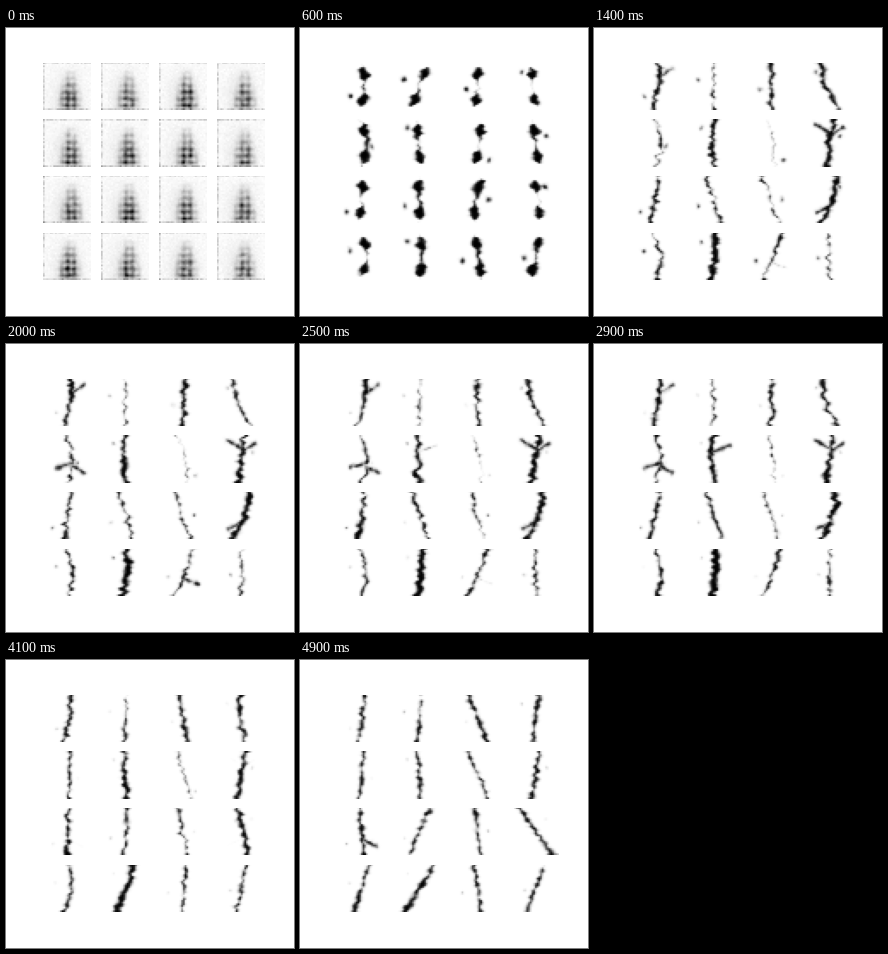
A matplotlib script for the animation above (5.1 s loop, 288 by 288 pixels).

```python
import numpy as np
import matplotlib.pyplot as plt
from matplotlib.animation import FuncAnimation

SIZE, TICKS, LAST = 28, 51, 49
BLOBS, STROKES, SETTLE, SETTLED = 6, 13, 36, 46  # ticks where the look changes
Y, X = np.mgrid[0:SIZE, 0:SIZE] + 0.5

# One value per cell: half the sideways travel from top to bottom in each phase,
# the bulge of the middle, and the half width of the stroke.
BLOB_LEAN = [0, 5, 1, -2, 0, -1, 2, -2, 1, 0, 2, -2, 0, 0, -2, 2]
LEAN = [2, 0, 0, -5, 0, 0, -2, 2, 2, -4, -4, 4, -1, 1, 5, 0]
FINAL_LEAN = [2, 1, -5, 2, 1, -1, -6, 2, -1, 6, -2, -9, 4, 8, -2, 5]
BEND = [2, 0, 0, -2, 3, -1, 1, 0, 0, 0, -1, 2, 3, 1, 1, 0]
WEIGHT = [1, 0, 1, .8, .4, 1.2, -.5, 1.5, .8, .5, .2, 1.5, .6, 1.9, .6, .3]

# Side branches: cell, tip, first and last tick.
ARMS = [(0, (24, 4), 10, 36), (4, (24, 22), 17, 30), (4, (8, 19), 17, 30),
        (5, (24, 6), 25, 36), (7, (6, 3), 11, 37), (7, (22, 5), 11, 37),
        (11, (7, 22), 11, 37), (14, (23, 21), 14, 22), (8, (23, 23), 42, 60)]


def ramp(t, start, end):
    k = np.clip((t - start) / (end - start), 0, 1)
    return k * k * (3 - 2 * k)


def mix(a, b, k):
    return a + (b - a) * k


def blur(a):
    """Three-tap smoothing along every axis."""
    for axis in range(a.ndim):
        pad = [(1, 1) if i == axis else (0, 0) for i in range(a.ndim)]
        p = np.moveaxis(np.pad(a, pad, mode="edge"), axis, 0)
        a = np.moveaxis((p[:-2] + 2 * p[1:-1] + p[2:]) / 4, 0, axis)
    return a


def segment(a, b):
    """Distance of every pixel from the line between two points."""
    (ax, ay), (bx, by) = a, b
    dx, dy = bx - ax, by - ay
    u = np.clip(((X - ax) * dx + (Y - ay) * dy) / (dx * dx + dy * dy), 0, 1)
    return np.hypot(X - ax - u * dx, Y - ay - u * dy)


def glyph(t, cell):
    """Ink of a handwritten one: blobs first, then a rough stroke, then a clean one."""
    traits = np.random.default_rng(cell)
    noise = np.random.default_rng(1000 * t + cell)
    stroke = ramp(t, BLOBS, STROKES)
    final = ramp(t, SETTLE, SETTLED)

    lean = mix(mix(BLOB_LEAN[cell], LEAN[cell], stroke), FINAL_LEAN[cell], final)
    bend = BEND[cell] * (1 - .9 * final)

    def spine(y):
        return 14.3 + lean * (14 - y) / 13 + bend * np.cos(np.pi * (y - 14) / 26)

    y = Y[:, :1]
    waist = traits.uniform(-1.5, .6)
    blobs = waist + (2.9 - waist) * (np.exp(-((y - 7) / 3.6) ** 2)
                                     + np.exp(-((y - 22) / 3.6) ** 2))
    blobs -= 2.5 * np.exp(-((y - 14.5) / 12) ** 2 * -1 - 1.6) * (abs(y - 14.5) > 11)
    taper = traits.uniform(-.35, .35) * (y - 14) / 13
    line = mix(WEIGHT[cell], .55 + .3 * WEIGHT[cell], final) + taper
    lumps = blur(noise.normal(0, 1, SIZE))[:, None] + .4 * np.cos(np.pi * y / 2)
    width = mix(blobs, line - .1, stroke) + mix(.35, .45, stroke) * lumps

    sway = blur(noise.normal(0, 1, SIZE))[:, None] * mix(.8, 1 - .35 * final, stroke)
    upright = 1 / np.hypot(1, lean / 13)
    field = abs(X - spine(Y) - sway) * upright - width

    for owner, tip, start, end in ARMS:
        shown = ramp(t, start - 3, start + 3) * (1 - ramp(t, end, end + 5))
        if owner == cell and shown > 0:
            root_y = (tip[1] + 14) / 2
            arm = segment((spine(root_y), root_y), tip) - mix(-2, .6, shown)
            field = np.minimum(field, arm)

    side = traits.choice([-1, 1])
    speck_x, speck_y = 14 + side * traits.uniform(6, 9), traits.uniform(4, 24)
    speck = np.hypot(X - speck_x, Y - speck_y) - mix(.9, -.6, ramp(t, BLOBS, 30))
    field = np.minimum(field, speck)

    field = field + .75 * blur(noise.normal(0, 1, X.shape))
    return 1 / (1 + np.exp(np.clip(field / .42, -30, 30)))


def untrained(cell):
    """The blurred, checkered column that every cell starts from."""
    rng = np.random.default_rng(100 + cell)
    centre, gain = 16 + rng.normal(0, .3), .72 + rng.normal(0, .05)
    spread = 3.2 + 2.2 * np.clip((Y - 7) / 16, 0, 1)
    column = np.exp(-abs((X - centre) / spread) ** 3)
    rise = np.clip((Y - 4) / 16, 0, 1) * np.where(Y > 26, .6, 1)
    checks = .6 + .2 * np.cos(np.pi * (X - 14.5) / 2) + .22 * np.cos(np.pi * (Y - 21.5) / 2)
    patches = 1 + .5 * blur(rng.normal(0, 1, X.shape))
    ink = gain * column * rise * checks * patches
    ink += .09 * np.exp(-((X - 14) / 8) ** 2) * np.clip(Y / 18, 0, 1) + .02
    for edge in (ink[:, 0], ink[0], ink[-1]):
        edge += rng.uniform(0, .22, SIZE)
    return ink + rng.normal(0, .012, X.shape)


START = [untrained(cell) for cell in range(16)]


def sample(t, cell):
    learned = ramp(t, 0, BLOBS)
    if learned == 0:
        return START[cell]
    return mix(START[cell], glyph(t, cell), learned)


fig, axes = plt.subplots(4, 4, figsize=(4, 4), dpi=72, facecolor="white")
fig.subplots_adjust(left=.125, right=.9, bottom=.125, top=.88, wspace=.2, hspace=.2)
images = []
for ax in axes.flat:
    ax.axis("off")
    images.append(ax.imshow(np.ones((SIZE, SIZE)), cmap="gray", vmin=0, vmax=1,
                            interpolation="hanning"))


def update(frame):
    t = min(frame, LAST)
    for cell, image in enumerate(images):
        image.set_data(1 - np.clip(sample(t, cell), 0, 1))
    return images


anim = FuncAnimation(fig, update, frames=TICKS, interval=100, repeat=True,
                     repeat_delay=0, blit=False)
plt.show()
```
